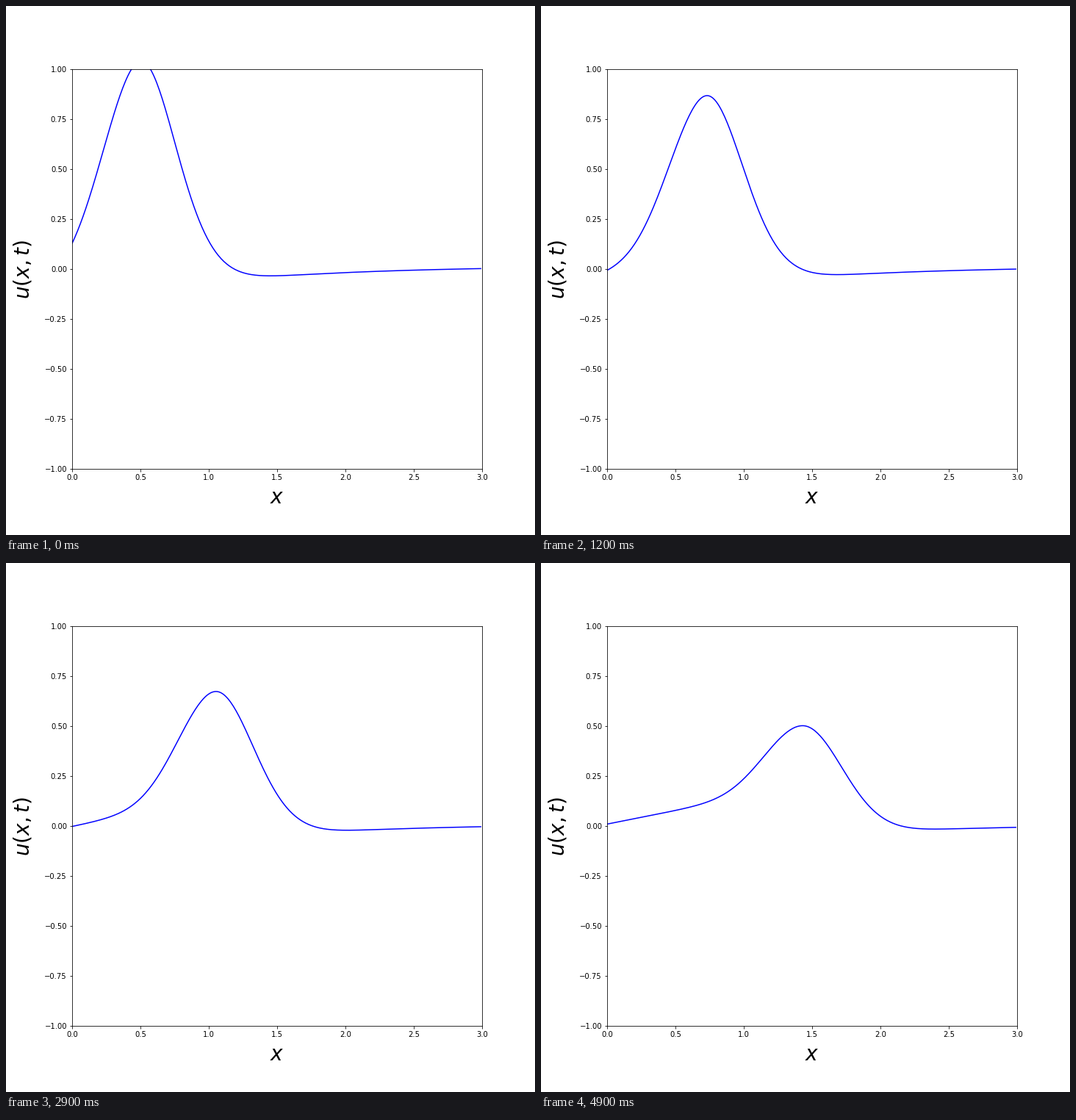
Animation, 720 px wide and 720 px high, one loop 5 s. Source, as a matplotlib script:

```python
import numpy as np
import matplotlib.pyplot as plt
from matplotlib.animation import FuncAnimation

FRAMES, INTERVAL = 50, 100
X = np.linspace(0, 3, 300, endpoint=False)


def wave(n):
    """A decaying bell that travels right over a different floor on each side."""
    age = n / (FRAMES - 1)
    height = 1.042 * np.exp(-0.0152 * n + 7e-6 * n**2)
    offset = X - (0.505 + 0.01889 * n)
    dist = np.abs(offset)

    # Behind the peak: a straight ramp that slowly rises.
    ramp = 0.017 - 0.086 * np.exp(-n / 19) + (0.15 - 0.0003 * n) * X
    left_width = 0.243 - 0.01 * age + 0.03 * np.tanh(4 * dist)

    # Ahead of the peak: a shallow trough that relaxes towards zero.
    trough = height * (0.0171 + 0.003 * age - 0.1217 * np.exp(-0.862 * dist))
    right_width = 0.25 + 0.04 * (dist + (1 - dist) * age)

    behind = offset < 0
    floor = np.where(behind, ramp, trough)
    width = np.where(behind, left_width, right_width)
    return floor + (height - floor) * np.exp(-0.5 * (dist / width) ** 2)


plt.rcParams["font.family"] = "DejaVu Sans"
fig, ax = plt.subplots(figsize=(10, 10), dpi=72)
fig.subplots_adjust(left=0.125, right=0.9, bottom=0.125, top=0.88)
ax.set_xlim(0, 3)
ax.set_ylim(-1, 1)
ax.set_xlabel("$x$", fontsize=28, labelpad=8)
ax.set_ylabel("$u(x,t)$", fontsize=28, labelpad=15)
line, = ax.plot(X, wave(0), color="blue", lw=1.5)


def update(n):
    line.set_ydata(wave(n))
    return line,


anim = FuncAnimation(fig, update, frames=FRAMES, interval=INTERVAL,
                     repeat=True, repeat_delay=0)
plt.show()
```
